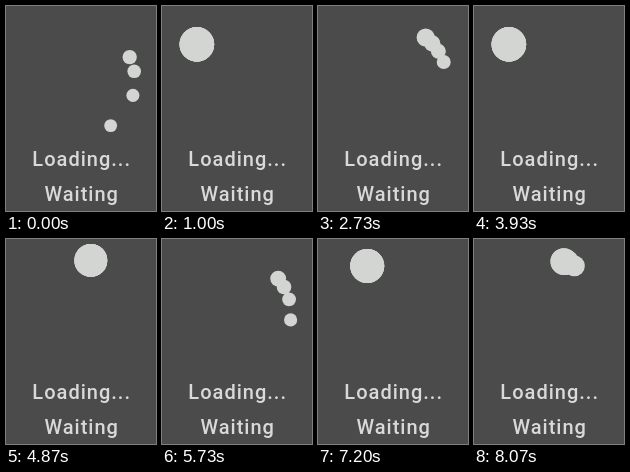
Recreate the animation shown at these times as an HTML page. Size 150 by 205 pixels, loop 8.19 s.

```html
<!DOCTYPE html>
<html lang="en">
<head>
<meta charset="utf-8">
<title>Loading</title>
<style>
  html, body { margin: 0; width: 100%; height: 100%; overflow: hidden; background: #4b4b4b; }
  svg { display: block; width: 100vw; height: 100vh; }
  text { font: 500 20px Roboto, sans-serif; letter-spacing: 1px; fill: #d9d9d9; text-anchor: middle; }
  circle { fill: #d3d5d2; }
</style>
</head>
<body>
<svg viewBox="0 0 150 205">
  <rect width="150" height="205" fill="#4b4b4b"/>
  <g id="dots"></g>
  <text x="75.7" y="160">Loading...</text>
  <text x="75.7" y="195">Waiting</text>
</svg>
<script>
const LOOP = 8190, TICK = 1000 / 15, TICKS_PER_STEP = 1.518, STEPS = 29;
const CX = 75, CY = 74.5, ORBIT = 54;
const LEAVE = 16, ARRIVE = 312; // degrees clockwise from the top
const MERGE = 10, SPLIT = 20;   // steps between which the dots are one

// Step and progress of the leading dot, slightly uneven.
const pace = [[21, -7.4], [27, -2.6], [29, 0], [34, 3.6], [38, 8.6]];

function progress(step) {
  const i = Math.max(1, pace.findIndex(([s]) => step <= s));
  const [s0, p0] = pace[i - 1], [s1, p1] = pace[i];
  return p0 + (p1 - p0) * (step - s0) / (s1 - s0);
}

// Slow at both ends, fast through the bottom of the ring.
function runAngle(p) {
  const u = p - 0.4;
  const angle = 166 + 9 * u + 75 * Math.tanh(u / 1.88);
  return Math.min(ARRIVE, Math.max(LEAVE, angle));
}

// Dots shrink after leaving and swell again on arrival.
const runRadius = angle =>
  6.4 + 14.5 * (Math.exp(-angle / 22) + Math.exp((angle - 320) / 10));

const group = document.getElementById("dots");
const dots = Array.from({ length: 4 }, () =>
  group.appendChild(document.createElementNS("http://www.w3.org/2000/svg", "circle")));

function place(dot, angle, r) {
  const a = angle * Math.PI / 180;
  dot.setAttribute("cx", (CX + ORBIT * Math.sin(a)).toFixed(2));
  dot.setAttribute("cy", (CY - ORBIT * Math.cos(a)).toFixed(2));
  dot.setAttribute("r", r.toFixed(2));
}

function draw(ms) {
  const tick = Math.floor((ms % LOOP + 5) / TICK);
  const step = Math.floor((tick + 0.53) / TICKS_PER_STEP) % STEPS;
  const drift = step - MERGE;
  const merged = drift >= 0 && step <= SPLIT;
  const lead = merged ? 0 : progress(drift < 0 ? step + STEPS : step);
  dots.forEach((dot, i) => {
    if (merged) {
      place(dot, ARRIVE + 6.5 * drift, 17.3 - 0.1 * drift);
    } else {
      const angle = runAngle(lead - i);
      place(dot, angle, runRadius(angle));
    }
  });
}

const start = performance.now();
function loop() {
  draw(performance.now() - start);
  requestAnimationFrame(loop);
}
draw(0);
requestAnimationFrame(loop);
</script>
</body>
</html>
```
